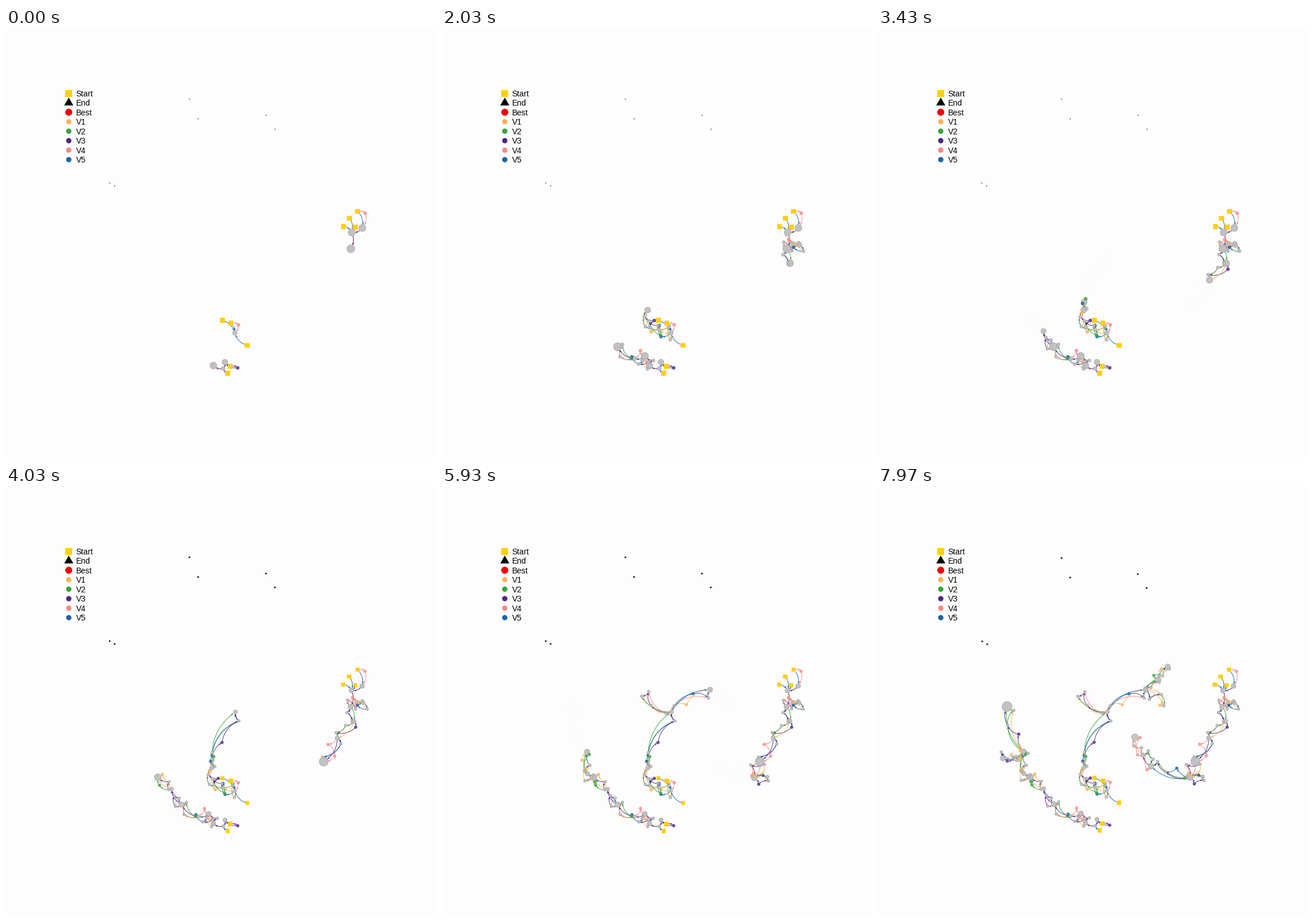
Write a matplotlib script that moves like this. It is 748x748 px and loops after 8000 ms.

```python
import math
import random
import numpy as np
import matplotlib.pyplot as plt
from matplotlib.animation import FuncAnimation
from matplotlib.patches import Circle, Polygon, Rectangle

SIZE, DPI = 748, 88
STEP, LOOP = 40, 8000
PT = 72 / DPI
LAST = 10                    # number of the final growth stage
RESIZE, SHRINK = 5, 8        # stages at which the scale of the plot changes
PAPER, GREY, GOLD = "#fdfdfd", "#bebebe", "#ffcf10"
COLORS = ["#fdb35a", "#37a33a", "#4f2683", "#f88888", "#1a63a8"]
STARTS = [30, 870, 1370, 2230, 3200, 4030, 4900, 5770, 6600, 7430]


class Cluster:
    """Search network: hubs on a path, smaller places scattered between them.

    Surplus hubs exist from the beginning, the rest appear one per stage.
    """

    def __init__(self, seed, starts, hubs):
        self.rng = random.Random(seed)
        self.starts = [np.array(p) for p in starts]
        self.nodes, self.edges = [], []
        hubs = [self.node(max(0, i - len(hubs) + LAST + 1), (x, y), r)
                for i, (x, y, r) in enumerate(hubs)]
        first = [h for h in hubs if h["birth"] == 0]
        self.begin(first)
        for i in range(len(first), len(hubs)):
            self.extend(self.nearest(hubs[:i], hubs[i]["pos"]), hubs[i])

    def node(self, birth, pos, r, color=GREY):
        item = dict(birth=birth, pos=np.array(pos), r=r, color=color, visits=0)
        self.nodes.append(item)
        return item

    def nearest(self, nodes, pos):
        return min(nodes, key=lambda n: math.dist(n["pos"], pos))

    def walk(self, color, path):
        for n in path:
            n["visits"] += 1
            if n["r"] < 2.7:
                n["color"] = color if n["visits"] == 1 else GREY
        self.edges += [(a, b, color) for a, b in zip(path, path[1:])]

    def begin(self, hubs):
        squares = [self.node(0, p, 3.6, GOLD) for p in self.starts]
        for s in squares:
            self.walk(COLORS[4], [s, self.nearest(hubs, s["pos"])])
        spur = self.node(0, self.starts[0] + (13, 3), 2.6)
        near = self.nearest(hubs, spur["pos"])
        self.walk(self.rng.choice(COLORS[2:4]), [squares[0], spur, near])
        for color in (COLORS[0], COLORS[2]):
            self.walk(color, hubs)

    def extend(self, a, b):
        rng = self.rng
        d = b["pos"] - a["pos"]
        length = math.hypot(*d)
        along = d / length
        across = np.array([along[1], -along[0]])
        pool = []
        for i in range(4):
            u = (i - 1.5) / 4 * max(length, 34)
            v = (-1) ** i * rng.uniform(2, 13)
            pos = (a["pos"] + b["pos"]) / 2 + u * along + v * across
            pool.append(self.node(b["birth"], pos, 2.6))
        for color in rng.sample(COLORS, 3):
            picks = sorted(rng.sample(range(4), 2))
            end = [b] if rng.random() < 0.8 else []
            self.walk(color, [a] + [pool[i] for i in picks] + end)
        self.walk(rng.choice(COLORS), [a, b])


CLUSTERS = [
    Cluster(4, [(390, 587), (385.5, 599)],
            [(381, 580, 3.7), (378, 591, 2.9), (361, 586, 4.2),
             (353, 569.5, 4.4), (335, 574, 3.2), (306, 553.5, 4.8),
             (288.5, 526.5, 3.5), (264.5, 506, 6), (253.5, 500, 4),
             (253, 462, 4.9), (224.5, 383.5, 8.8), (240, 471, 3),
             (217, 474, 4.6)]),
    Cluster(11, [(391, 512.5), (376.5, 508), (419.5, 551)],
            [(398, 529.5, 3.2), (378, 524, 2.8), (362, 520, 2.9),
             (358, 490, 3.8), (359, 476, 3.8), (399, 393, 3.6),
             (347.5, 366, 2.7), (466, 354.5, 4.7), (497, 382, 3),
             (487, 337, 5.3), (504, 314, 4.7)]),
    Cluster(7, [(610.5, 319.5), (596, 331.5), (586, 345.5), (606.5, 346.5)],
            [(618.5, 348, 4.3), (600, 356, 4.3), (598.5, 384, 4.7),
             (620, 377, 3.6), (609, 377, 4), (604, 409, 4.3),
             (575.5, 438, 4), (552, 479, 8), (542.5, 507, 5.3),
             (565, 505.5, 3.2), (475, 487.5, 5.3), (461, 468, 4),
             (447, 437, 6)]),
]
SPECKS = [(320, 125.2), (335, 159.3), (452.5, 153.3), (468, 177.3),
          (182, 270.3), (190.5, 275.2)]

fig = plt.figure(figsize=(SIZE / DPI, SIZE / DPI), dpi=DPI, facecolor=PAPER)
ax = fig.add_axes([0, 0, 1, 1])


def reset_axes():
    ax.clear()
    ax.set_xlim(0, SIZE)
    ax.set_ylim(SIZE, 0)
    ax.axis("off")


def place(pos, stage):
    k = 1.006 if stage < RESIZE else 1.0045 if stage < SHRINK else 1
    center = np.array([395, 385])
    return center + k * (np.array(pos) - center)


def radius(node, stage):
    r = node["r"]
    if stage >= RESIZE:
        return r
    return 4.3 if node["color"] == GOLD else 2.9 + (r - 2.6) * 2


def shape(points, color, **kw):
    ax.add_patch(Polygon(points, fc=color, lw=0, **kw))


def square(x, y, half):
    ax.add_patch(Rectangle((x - half, y - half), 2 * half, 2 * half,
                           fc=GOLD, lw=0, zorder=4))


def dot(x, y, r, color, lw=0, **kw):
    ax.add_patch(Circle((x, y), r, fc=color, lw=lw, **kw))


def draw_edge(p, q, rp, rq, color):
    d = q - p
    ctrl = (p + q) / 2 + 0.28 * np.array([d[1], -d[0]])
    t = np.linspace(0, 1, 60)[:, None]
    curve = (1 - t) ** 2 * p + 2 * t * (1 - t) * ctrl + t ** 2 * q
    curve = curve[(np.hypot(*(curve - p).T) > rp)
                  & (np.hypot(*(curve - q).T) > rq)]
    if len(curve) < 3:
        return
    ax.plot(*curve.T, color=color, lw=1.15 * PT, alpha=0.8, zorder=1)
    tip, back = curve[-1], curve[-3]
    u = (tip - back) / math.dist(tip, back)
    side = 1.7 * np.array([u[1], -u[0]])
    base = tip - 3.4 * u
    shape([tip, base + side, base - side], color, alpha=0.9, zorder=2)


def draw_cluster(cluster, stage):
    for a, b, color in cluster.edges:
        if max(a["birth"], b["birth"]) <= stage:
            draw_edge(place(a["pos"], stage), place(b["pos"], stage),
                      radius(a, stage), radius(b, stage), color)
    for n in cluster.nodes:
        if n["birth"] > stage or not n["visits"]:
            continue
        x, y = place(n["pos"], stage)
        r, color = radius(n, stage), n["color"]
        if color == GOLD:
            square(x, y, r)
        else:
            grey = color == GREY
            dot(x, y, r - 0.2, color, ec="#9c9c9c" if grey else color,
                lw=0.7 * PT, alpha=0.95 if grey else 0.82, zorder=3)


def draw_legend():
    x, top, gap = 109.2, 113.5, 16.5
    square(x, top, 6)
    shape([(x, 121), (x - 7.9, 134.7), (x + 7.9, 134.7)], "black")
    dot(x, top + 2 * gap, 6.1, "#f60008")
    for i, color in enumerate(COLORS):
        dot(x, top + (i + 3) * gap, 4.6, color)
    names = ["Start", "End", "Best"] + [f"V{i}" for i in range(1, 6)]
    for i, name in enumerate(names):
        ax.text(121.5, top + i * gap + 5, name, fontsize=14 * PT,
                family="Liberation Sans", color="black", va="baseline")


def snapshot(stage):
    reset_axes()
    draw_legend()
    s = 1 if stage < RESIZE else 1.8
    for speck in SPECKS:
        x, y = place(speck, stage)
        shape([(x + s, y), (x - s, y - s), (x - s, y + s)], "black")
    for cluster in CLUSTERS:
        draw_cluster(cluster, stage)
    fig.canvas.draw()
    return np.array(fig.canvas.buffer_rgba())[..., :3] / 255


def ease(u):
    return 16 * u ** 5 if u < 0.5 else 1 - (2 - 2 * u) ** 5 / 2


def progress(t, i):
    """How far the fade into stage i + 1 has come, from 0 to 1."""
    following = STARTS[i + 1] if i + 1 < len(STARTS) else math.inf
    end = min(STARTS[i] + 800, following - 30)
    return ease(min(max((t - STARTS[i]) / (end - STARTS[i]), 0), 1))


shots = [snapshot(i) for i in range(LAST + 1)]
reset_axes()
view = ax.imshow(shots[0], extent=(0, SIZE, SIZE, 0), interpolation="nearest",
                 aspect="auto")


def update(frame):
    t = frame * STEP
    i = max(sum(t >= s for s in STARTS) - 1, 0)
    w = progress(t, i)
    view.set_data(np.clip((1 - w) * shots[i] + w * shots[i + 1], 0, 1))
    return [view]


anim = FuncAnimation(fig, update, frames=LOOP // STEP, interval=STEP,
                     repeat=True, repeat_delay=0, blit=False)
plt.show()
```
